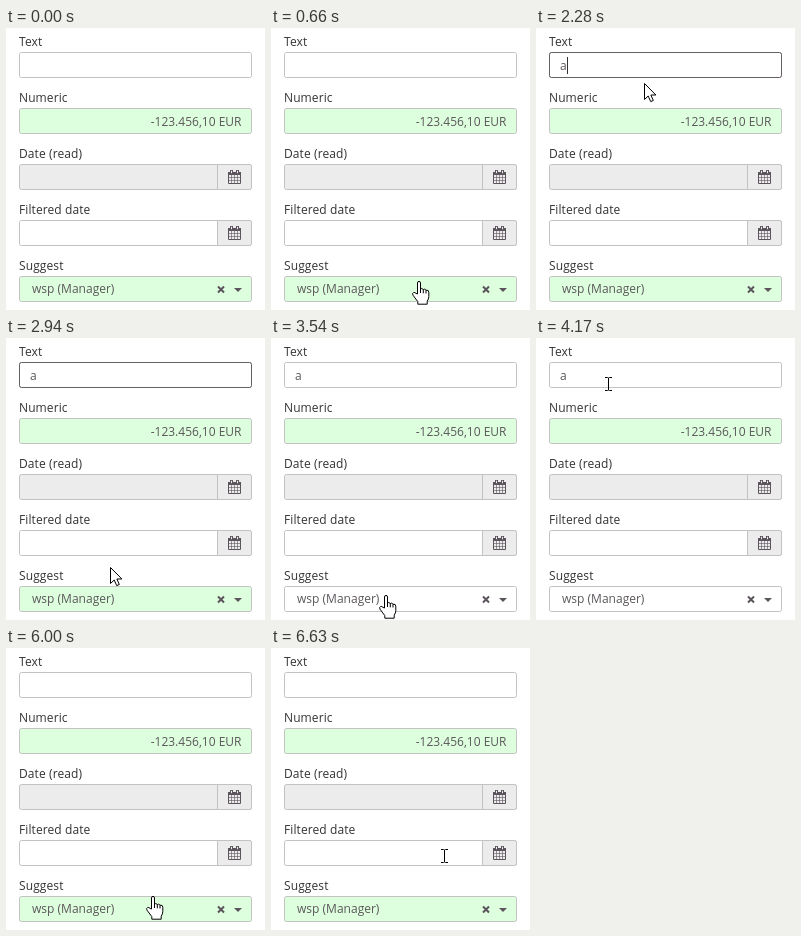
Write an HTML page that moves like this. It is 259 px wide and 282 px high and loops after 6.78 s.

```html
<!DOCTYPE html>
<html lang="en">
<head>
<meta charset="utf-8">
<title>Form filter</title>
<style>
  html, body { margin: 0; width: 100%; height: 100%; overflow: hidden; background: #fff; }
  svg { display: block; }
  text { font: 12px "Open Sans", "Noto Sans", sans-serif; fill: #5c575c; }
  .label { font-weight: 500; letter-spacing: .1px; fill: #333; }
  .box { fill: #fff; stroke: #c2c2c2; }
  .green { fill: #dfd; }
  .gray { fill: #ececec; }
  .focus { fill: none; stroke: #665f63; }
  .glyph { fill: #5c545c; }
  .line { fill: none; stroke: #5c545c; }
  .pointer { fill: #fff; stroke: #000; stroke-linejoin: round; }
</style>
</head>
<body>
<svg width="259" height="282" viewBox="0 0 259 282">
  <defs>
    <rect id="input" x=".5" y="24.5" width="232" height="25" rx="2"/>
    <g id="addon">
      <path class="box gray" d="M198.5 24.5h32a2 2 0 0 1 2 2v21a2 2 0 0 1-2 2h-32z"/>
      <g transform="translate(209 30)">
        <path class="line" d="M.5 2.5h12v11h-12z"/>
        <path class="glyph" d="M0 2h13v3H0zM2 0h3v4H2zM8 0h3v4H8z"/>
        <path class="line" d="M3.5 5v8M6.5 5v8M9.5 5v8M1 7.5h11M1 10.5h11" stroke-width=".6"/>
        <path d="M3.5 .8v2.4M9.5 .8v2.4" stroke="#ececec"/>
      </g>
    </g>
  </defs>

  <g transform="translate(13 0)">
    <text class="label" y="18">Text</text>
    <use href="#input" class="box"/>
    <use href="#input" class="focus" id="focus"/>
    <text id="typed" x="11" y="42">a</text>
    <rect id="caret" y="29" width="1" height="17" fill="#333"/>
  </g>
  <g transform="translate(13 56)">
    <text class="label" y="18">Numeric</text>
    <use href="#input" class="box green"/>
    <text x="222.5" y="42" text-anchor="end">-123.456,10 EUR</text>
  </g>
  <g transform="translate(13 112)">
    <text class="label" y="18">Date (read)</text>
    <use href="#input" class="box gray"/>
    <use href="#addon"/>
  </g>
  <g transform="translate(13 168)">
    <text class="label" y="18">Filtered date</text>
    <use href="#input" class="box"/>
    <use href="#addon"/>
  </g>
  <g transform="translate(13 224)">
    <text class="label" y="18">Suggest</text>
    <use href="#input" class="box" id="suggest"/>
    <text x="13" y="41">wsp (Manager)</text>
    <path class="line" d="M199 34.5l6 6M205 34.5l-6 6" stroke-width="2"/>
    <path class="glyph" d="M215 36h8l-4 4z"/>
  </g>

  <g id="cursor">
    <path id="arrow" class="pointer" d="M.5 .5v16l3.7-3.5 2.5 5.6 2.6-1.1-2.4-5.5h5z"/>
    <g id="hand">
      <path class="pointer" d="M-1.5 13V2q0-1.6 1.5-1.6T1.5 2v6q1.2-1.2 2.8 .5 1.5-1 2.7 .7 2.8-.5 2.8 2v4.3q0 2.5-1.6 4.7v3H-1.2v-2.6L-6 14.2q-1-2 .6-2.7 1.3-.4 2.4 .9z"/>
      <path d="M1.5 8v4M4.3 8.5v3.8M7 9.3v3.2" stroke="#000"/>
    </g>
    <path id="beam" d="M-3-6.5h2.5l1 .5 1-.5H4M.5-6v12M-3 6.5h2.5l1-.5 1 .5H4" fill="none" stroke="#000"/>
  </g>
</svg>

<script>
const LOOP = 6780, STEP = 30, BLINK = 265, FADE = 75;
const el = id => document.getElementById(id);
const within = (v, a, b) => v >= a && v < b;
const clamp = v => Math.max(0, Math.min(1, v));
const ease = k => k * k * (3 - 2 * k);
const show = (id, on) => el(id).setAttribute('visibility', on ? 'visible' : 'hidden');

const entry = { focus: 1380, edit: 2100, blur: 3000 };
const removal = { focus: 4320, edit: 4920, blur: 5460 };

// Pointer starts below the stage; each move runs start, end, x, y
const origin = [142, 290];
const moves = [
  [390, 660, 148, 253],
  [660, 1200, 108, 44],
  [2190, 2790, 104, 229],
  [3090, 3510, 115, 258],
  [3510, 4140, 72, 46],
  [4860, 5130, 91, 72],
  [5580, 6060, 150, 256],
  [6060, 6630, 173, 208]
];

function pointAt(t) {
  let [x, y] = origin;
  for (const [start, end, toX, toY] of moves) {
    const k = ease(clamp((t - start) / (end - start)));
    x += (toX - x) * k;
    y += (toY - y) * k;
  }
  return [Math.round(x), Math.round(y)];
}

function shapeAt(y) {
  const row = Math.floor(y / 56);
  if (y % 56 < 24 || y % 56 >= 50 || row === 2) return 'arrow';
  return row === 4 ? 'hand' : 'beam';
}

function drawPointer(t) {
  const [x, y] = pointAt(t), shape = shapeAt(y);
  el('cursor').setAttribute('transform', `translate(${x} ${y})`);
  for (const id of ['arrow', 'hand', 'beam']) show(id, id === shape);
}

function drawField(t) {
  const { focus, edit, blur } = t < entry.blur ? entry : removal;
  const filled = within(t, entry.edit, removal.edit);
  const focused = within(t, focus, blur);
  const blinkStart = t < edit ? focus : edit;

  el('focus').setAttribute('opacity', t < blur ? clamp((t - focus + FADE / 2) / FADE) : 0);
  show('typed', filled);
  show('caret', focused && Math.floor((t - blinkStart) / BLINK) % 2 === 0);
  el('caret').setAttribute('x', filled ? 18 : 11);
  el('suggest').classList.toggle('green', !within(t, entry.blur, removal.blur));
}

function draw() {
  const now = performance.now() % LOOP;
  const t = now - now % STEP;
  drawField(t);
  drawPointer(t);
  requestAnimationFrame(draw);
}
draw();
</script>
</body>
</html>
```
